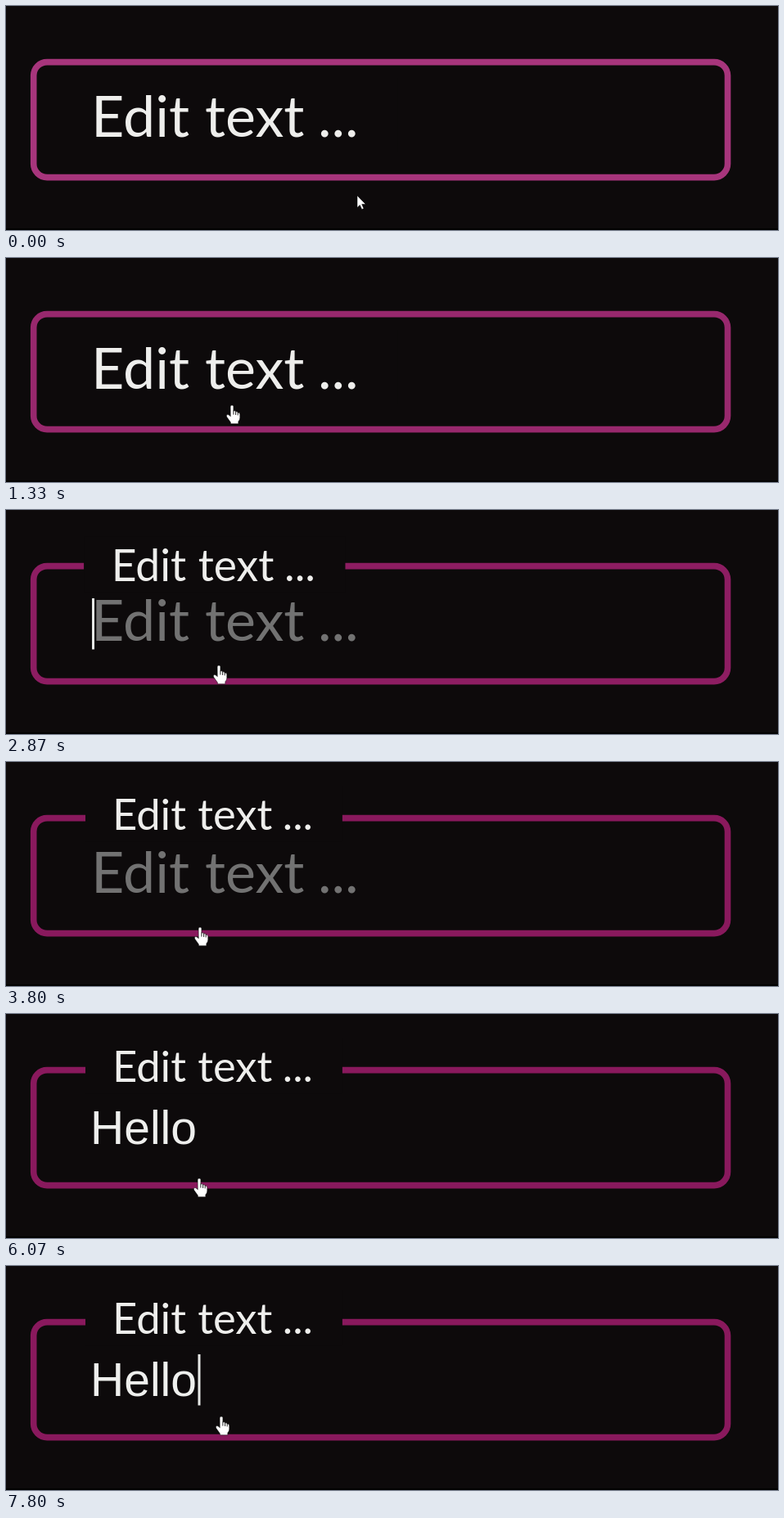
Recreate the animation shown at these times as an HTML page. Size 943 px wide and 274 px high, loop 8000 ms.

```html
<!DOCTYPE html>
<html lang="en">
<head>
<meta charset="utf-8">
<title>Floating label input</title>
<style>
  html, body { margin: 0; width: 100%; height: 100%; overflow: hidden; background: #0d0a0b; }
  svg { display: block; width: 943px; height: 274px; }
  svg * { animation-duration: 8s; animation-iteration-count: infinite; animation-timing-function: linear; }
  .step { animation-timing-function: step-end; }

  .hint, .label text { font: 70px Lato, "Open Sans", sans-serif; }
  .hint { fill: #727272; animation-name: hint; }
  .label { animation-name: label; }
  .label text { fill: #eeeeec; }
  .bg { fill: #0d0a0b; }
  .frame { fill: none; stroke-width: 7.6; animation-name: frame; }
  .typed { font: 57px "Liberation Sans", Arial, sans-serif; fill: #eeefed; }
  .k1 { animation-name: k1; }
  .k2 { animation-name: k2; }
  .k3 { animation-name: k3; }
  .k4 { animation-name: k4; }
  .k5 { animation-name: k5; }
  .caret { fill: #e6e8e6; animation-name: caretMove; }
  .caret rect { animation-name: caretBlink; }
  .cursor { animation-name: move; }
  .cursor path { stroke-linejoin: round; stroke-linecap: round; }
  .arrow { animation-name: arrow; }
  .hand { animation-name: hand; }

  /* idle, hover and focus colours */
  @keyframes frame {
    0%, 12.2% { stroke: #a7357c; }
    14.7%, 23.4% { stroke: #98286d; }
    25.9%, 28.5% { stroke: #a7357c; }
    31%, 34.1% { stroke: #98286d; }
    36.6%, 82.4% { stroke: #89195d; }
    85%, 91.2% { stroke: #a6347a; }
    93.7%, 95.6% { stroke: #98286d; }
    97.4%, 100% { stroke: #89195d; }
  }
  @keyframes label {
    0%, 34.1% { transform: translate(104px, 160px) scale(1); animation-timing-function: ease; }
    36.6%, 100% { transform: translate(130px, 83px) scale(.75); }
  }
  @keyframes hint { 0% { visibility: visible; } 61.6%, 100% { visibility: hidden; } }
  @keyframes k1 { 0% { visibility: hidden; } 61.6%, 100% { visibility: visible; } }
  @keyframes k2 { 0% { visibility: hidden; } 64.1%, 100% { visibility: visible; } }
  @keyframes k3 { 0% { visibility: hidden; } 65.85%, 100% { visibility: visible; } }
  @keyframes k4 { 0% { visibility: hidden; } 66.6%, 100% { visibility: visible; } }
  @keyframes k5 { 0% { visibility: hidden; } 69.1%, 100% { visibility: visible; } }
  @keyframes caretMove {
    0% { transform: translateX(105px); }
    61.6% { transform: translateX(144px); }
    64.1% { transform: translateX(175.5px); }
    65.85% { transform: translateX(189px); }
    66.6% { transform: translateX(203px); }
    69.1%, 100% { transform: translateX(234.5px); }
  }
  @keyframes caretBlink {
    0% { visibility: hidden; }
    34.2% { visibility: visible; }
    40.8% { visibility: hidden; }
    48.3% { visibility: visible; }
    54.9% { visibility: hidden; }
    61.6% { visibility: visible; }
    75.8% { visibility: hidden; }
    95.8%, 100% { visibility: visible; }
  }
  @keyframes move {
    0%, .6% { transform: translate(429px, 232px); }
    3.8% { transform: translate(405px, 223px); }
    7.5% { transform: translate(370px, 212px); }
    10.8%, 11.1% { transform: translate(349px, 217px); }
    16.5%, 19.6% { transform: translate(276px, 180px); }
    23.4% { transform: translate(292px, 214px); }
    25.9% { transform: translate(304px, 226px); }
    28.4% { transform: translate(292px, 216px); }
    29.9%, 30.3% { transform: translate(283px, 192px); }
    33.8%, 43% { transform: translate(260px, 190px); }
    45.6% { transform: translate(240px, 209px); }
    47.5% { transform: translate(237px, 202px); }
    49.1%, 50.3% { transform: translate(237px, 210px); }
    51.6% { transform: translate(232px, 206px); }
    52.5%, 77.8% { transform: translate(236px, 201px); }
    82%, 88.6% { transform: translate(237px, 236px); }
    94.1%, 100% { transform: translate(263px, 184px); }
  }
  @keyframes arrow {
    0% { visibility: visible; }
    12.2% { visibility: hidden; }
    23.4% { visibility: visible; }
    28.5% { visibility: hidden; }
    79.3% { visibility: visible; }
    91.2%, 100% { visibility: hidden; }
  }
  @keyframes hand {
    0% { visibility: hidden; }
    12.2% { visibility: visible; }
    23.4% { visibility: hidden; }
    28.5% { visibility: visible; }
    79.3% { visibility: hidden; }
    91.2%, 100% { visibility: visible; }
  }
</style>
</head>
<body>
<svg viewBox="0 0 943 274">
  <rect class="bg" width="943" height="274"/>
  <rect y="272" width="943" height="2" fill="#020202"/>
  <rect class="frame" x="33.7" y="68.6" width="847.8" height="141" rx="16.5"/>

  <text class="hint step" x="104" y="160">Edit<tspan x="243">text</tspan><tspan x="381">...</tspan></text>
  <g class="label">
    <rect class="bg" x="-44" y="-72" width="418.5" height="91"/>
    <text>Edit<tspan x="139">text</tspan><tspan x="277">...</tspan></text>
  </g>

  <text class="typed" x="103" y="159"><tspan class="k1 step">H</tspan><tspan class="k2 step">e</tspan><tspan class="k3 step">l</tspan><tspan class="k4 step">l</tspan><tspan class="k5 step">o</tspan></text>
  <g class="caret step"><rect class="step" y="108" width="3" height="62.5"/></g>

  <g class="cursor">
    <path class="arrow step" d="M0 0V14.6L3.3 11.5 5.7 16.8 8 15.7 5.7 10.5H10.2Z" fill="#fff" stroke="#000" stroke-width=".5"/>
    <g class="hand step">
      <path d="M-1.9 1.6Q-1.8 0 0 0T1.9 1.6V7Q4 6.2 4.6 8 6.6 7.2 7.2 9.2 9.8 8.7 9.8 11.4V15.5Q9.8 18 7.8 20V22.8H-1.6V21L-6.2 14.6Q-7.3 12.6-5.8 11.6-4.3 11-1.9 13.6Z" fill="#fff" stroke="#000" stroke-width=".5"/>
      <path d="M1.9 7V11.2M4.6 8V11.6M7.2 9.2V12" fill="none" stroke="#111" stroke-width=".9"/>
    </g>
  </g>
</svg>
</body>
</html>
```
